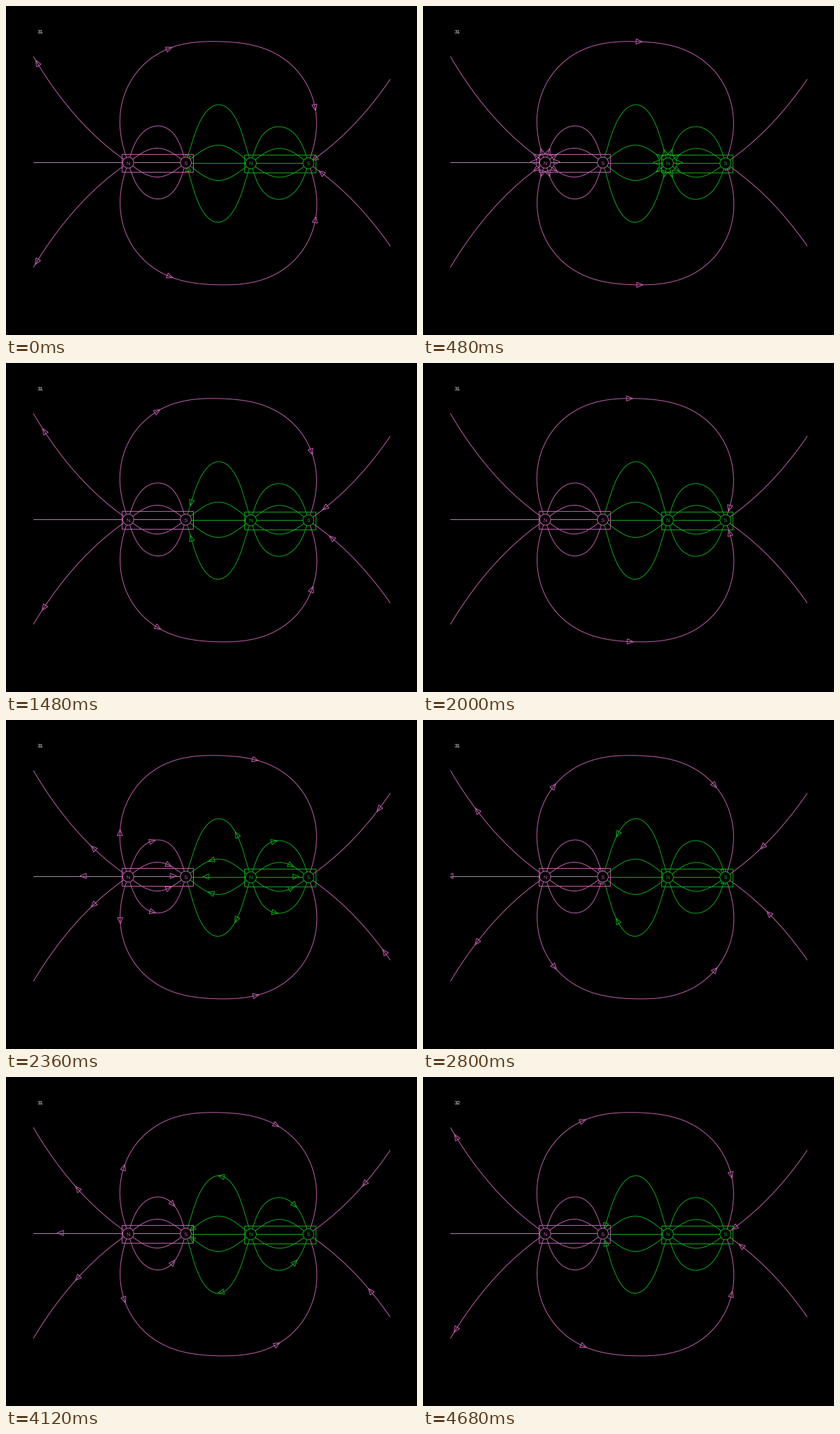
A matplotlib script for the animation above (4.72 s loop, 600 by 480 pixels).

```python
import numpy as np
import matplotlib.pyplot as plt
from matplotlib.animation import FuncAnimation
from matplotlib.collections import PolyCollection
from matplotlib.patches import Circle, Rectangle

W, H, DPI = 600, 480, 100
PX = 72 / DPI
FRAMES, STEP_MS = 118, 40

PINK, GREEN, GREY = "#c060ac", "#10a81c", "#a884a4"
N1, S1, N2, S2 = (178, 228), (262, 228), (357, 229), (441, 229)
POLES = np.array([N1, S1, N2, S2], float)
CHARGE = np.array([1, -1, 1, -1])

SPACING = 260                # distance between arrows on one line
STRIDE = 3 * SPACING / 149   # one simulation tick; three cycles per loop
HEAD, HALF = 9, 3.8          # arrow length and half width


def field(p):
    """Unit direction of the field of four point poles."""
    d = p - POLES
    f = (CHARGE / np.hypot(*d.T) ** 3) @ d
    return f / np.hypot(*f)


def trace(seed, sign, length):
    """Follow the field from seed until a pole or the given length."""
    p, path = np.array(seed, float), []
    for _ in range(int(length)):
        p = p + sign * field(p + sign * field(p) / 2)
        path.append(p)
        gap = np.hypot(*(POLES - p).T)
        if gap.min() < 2:
            path.append(POLES[gap.argmin()])
            break
    return path


class FieldLine:
    def __init__(self, pts, color=None, line_color=None):
        self.pts = np.array(pts, float)
        self.color = color or (GREEN if tuple(self.pts[0]) == N2 else PINK)
        self.line_color = line_color or self.color
        self.dist = np.r_[0, np.cumsum(np.hypot(*np.diff(self.pts, axis=0).T))]

    def at(self, s):
        return np.array([np.interp(s, self.dist, c) for c in self.pts.T])

    def arrows(self, phase):
        heads = []
        for s in np.arange(phase, self.dist[-1], SPACING):
            if s < 2:
                continue
            tip = self.at(s)
            d = tip - self.at(s - HEAD)
            d /= np.hypot(*d)
            side = HALF * np.array([-d[1], d[0]])
            tail = tip - HEAD * d
            heads.append([tip, tail + side, tail - side])
        return heads


def through(seed, back=999, ahead=999):
    return FieldLine(trace(seed, -1, back)[::-1] + [seed] + trace(seed, 1, ahead))


def straight(start, end_x, color, line_color=None):
    x, y = start[0], start[1] - 1
    return FieldLine([(x, y), (end_x, y)], color, line_color)


# closed lines, given by the heights of their crests
CRESTS = {309.5: (51.3, 143.5, 202.5, 254, 315, 406.3),
          220: (174.5, 207, 249, 281),
          399: (175.5, 207.3, 249.3, 281.5)}
lines = [through((x, y)) for x, crests in CRESTS.items() for y in crests]

# open lines run past the visible area and are clipped
lines += [through((40, y), ahead=15) for y in (74, 380)]
lines += [through((560, y), back=b) for y, b in ((107, 38), (349, 52))]

lines += [straight(N1, 22, PINK, GREY), straight(N1, S1[0], PINK, GREY),
          straight(N2, S1[0], GREEN), straight(N2, S2[0], GREEN)]

fig = plt.figure(figsize=(W / DPI, H / DPI), dpi=DPI, facecolor="black")
ax = fig.add_axes([0, 0, 1, 1])
ax.set_xlim(-0.5, W - 0.5)
ax.set_ylim(H - 0.5, -0.5)
ax.axis("off")
view = Rectangle((39.5, 0), 521, H, transform=ax.transData)

for line in lines:
    curve, = ax.plot(*line.pts.T, color=line.line_color, lw=PX, zorder=1)
    curve.set_clip_path(view)

heads = {}
for color in (PINK, GREEN):
    heads[color] = PolyCollection([], facecolors="none", edgecolors=color,
                                  linewidths=PX, zorder=2)
    ax.add_collection(heads[color], autolim=False)
    heads[color].set_clip_path(view)


def label(x, y, text, color, ha="center"):
    return ax.text(x, y, text, color=color, family="Liberation Sans",
                   size=8 * PX, ha=ha, va="center_baseline", zorder=5)


for north, south, color in [(N1, S1, PINK), (N2, S2, GREEN)]:
    ax.add_patch(Rectangle((north[0] - 10, north[1] - 13), 104, 26, fill=False,
                           ec=color, lw=PX, zorder=3))
    for pole, name in [(north, "N"), (south, "S")]:
        ax.add_patch(Circle(pole, 8, fc="black", ec=color, lw=PX, zorder=4))
        label(pole[0], pole[1] + 0.5, name, color)

rate = label(45.5, 36.5, "31", "#e0e0e0", ha="left")


def update(i):
    # the simulation ticks at a rate creeping from 31 to 32 per second
    t = i * STEP_MS / 1000
    ticks = int(31.25 * t + 0.08 * t * t)
    phase = (203 + STRIDE * ticks) % SPACING
    for color, group in heads.items():
        group.set_verts([h for line in lines if line.color == color
                         for h in line.arrows(phase)])
    # the readout refreshes every 13 steps and flickers near the end
    fast = i >= 80 and (i - 2) // 13 % 2 == 0
    rate.set_text("32" if fast else "31")
    return [*heads.values(), rate]


anim = FuncAnimation(fig, update, frames=FRAMES, interval=STEP_MS,
                     repeat=True, repeat_delay=0, blit=False)
plt.show()
```
